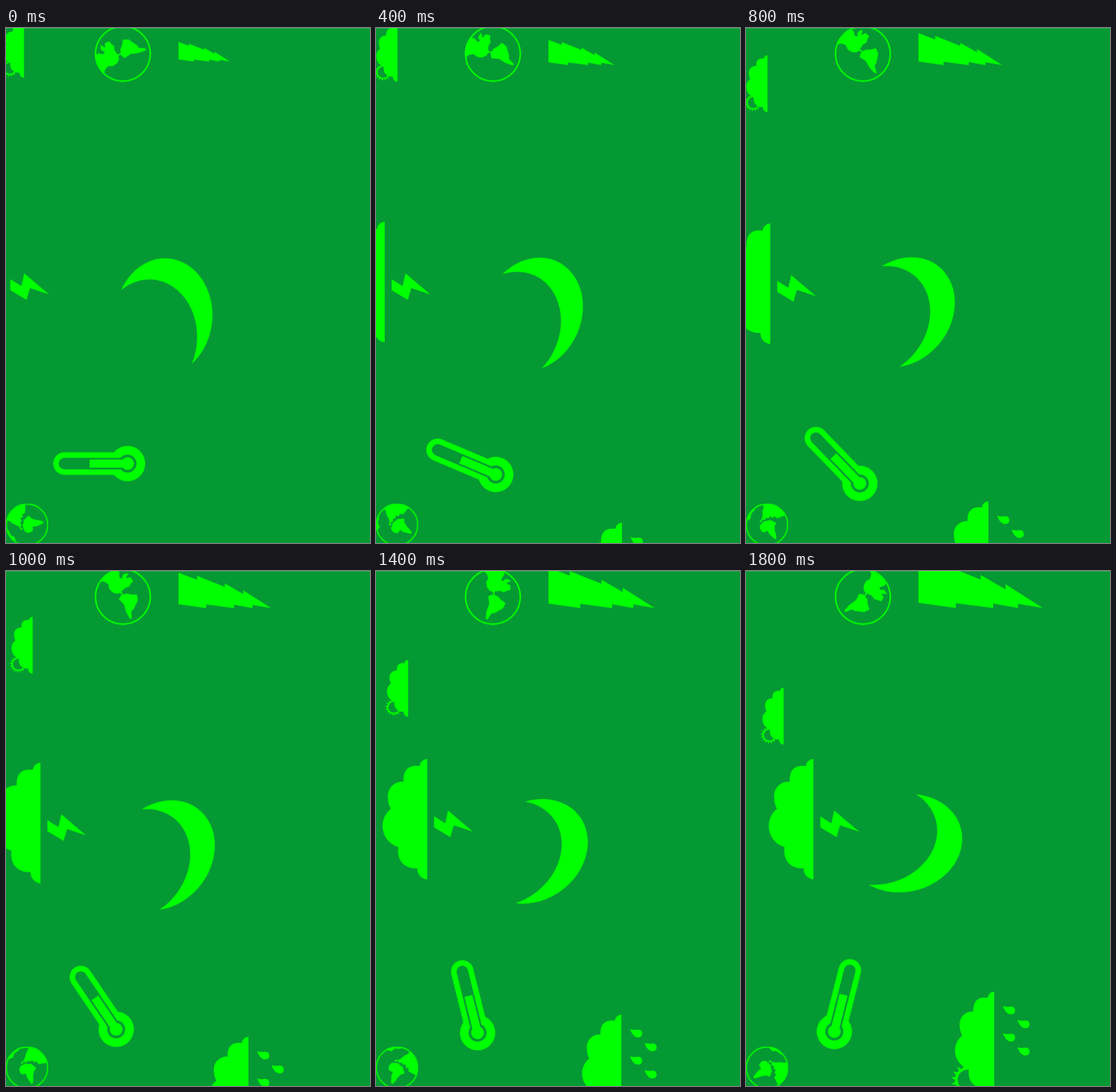
Write an HTML page that moves like this. It is 629x890 px and loops after 2000 ms.

```html
<!DOCTYPE html>
<html lang="en">
<head>
<meta charset="utf-8">
<title>Weather icons</title>
<style>
  html, body { margin: 0; width: 100%; height: 100%; overflow: hidden; background: #059933; }
  svg { display: block; width: 629px; height: 890px; }
  g { transform-origin: 0 0; }
</style>
</head>
<body>
<svg viewBox="0 0 629 890" fill="#0f0">
  <defs>
    <path id="cloud" d="M0 0A13 13 0 0 0-13 12H-15C-32 10-42 19-41 39C-57 38-68 50-68 65Q-68 77-63 86A38 38 0 0 0-50 152C-53 175-40 190-17 189A18 18 0 0 0 0 208Z"/>
    <g id="sunny">
      <circle cx="-52" cy="173" r="22.5" fill="none" stroke="#0f0" stroke-width="5"/>
      <path id="rays"/>
      <use href="#cloud"/>
    </g>
    <path id="drop" d="M0 0Q8 2 13 .8C18 0 21 3 21 7.5C21 12 18 14.2 14 14.2C7 14.2 3 8 0 0Z"/>
  </defs>

  <g id="wedge">
    <path d="M0-38.2L20-30.6V-34.8L50-22.9V-26.6L70-15.1V-19.1L100 0L80-3.4V0L60-3.6V0L30-3.9V0L0-4.2Z"/>
  </g>

  <g transform="translate(202 44.5)">
    <circle r="47.3" fill="none" stroke="#0f0" stroke-width="2.6"/>
    <g class="globe">
      <path d="M-27-38L-21-36L-16-29L-17.5-21L-14-13L-8-8.5L-2-8L0-3L3-2.5L1-6L1-10L5-11L8-13L16-12.5L20-16L26-19L24-27L16-28L23-35L14-36L9-30L6-33L9-42L7-46A46.6 46.6 0 0 0-27-38Z"/>
      <path d="M-8 1.5L-2-3.5L8-3L15 1.5L24 5L22 15L10 26.5L5 28.5L1 40.5L-2 40L-4 27L-3 13Z"/>
    </g>
  </g>

  <g transform="translate(36.3 858.5)">
    <circle r="35.8" fill="none" stroke="#0f0" stroke-width="2.2"/>
    <g class="globe">
      <path d="M35 4L21 1L19-5L15-4L13-9L8-8L6-11L2-9L-2-12L-6-8L-7-12L-1-14L3-18L7-24L12-28L14-32A35 35 0 0 1 35 4Z"/>
      <path d="M-25-25L-17-25L-12-31L-3-33L-2-35A35 35 0 0 0-25-25Z"/>
      <path d="M-14-1L-11-6L0-8L5-5L9-4L12 1L15 6L9 10L5 17L4 21L0 29L-3 28L-6 15L-5 9L-12 8L-14 4Z"/>
    </g>
  </g>

  <g id="sun"><use href="#sunny" transform="scale(.474)"/></g>

  <g id="storm">
    <use href="#cloud"/>
    <path d="M12 99L31 111L36 89L79 125.5L46 114.5L40 135L12 118Z"/>
  </g>

  <g id="rain">
    <use href="#sunny" transform="scale(.88)"/>
    <use href="#drop" x="15" y="25"/>
    <use href="#drop" x="40" y="49"/>
    <use href="#drop" x="15" y="72"/>
    <use href="#drop" x="40" y="96"/>
  </g>

  <g id="moon">
    <path d="M1.5-88A100.8 83.8-41.4 1 1-1.5 88A101.6 84.4-41.4 0 0 1.5-88Z"/>
  </g>

  <g id="thermo">
    <path d="M-60 0H49" stroke="#0f0" stroke-width="39" stroke-linecap="round"/>
    <circle cx="49" r="30.5"/>
    <path d="M-60 0H49" stroke="#059933" stroke-width="20" stroke-linecap="round"/>
    <circle cx="49" r="15.5" fill="#059933"/>
    <path d="M-16.5 0H49" stroke="#0f0" stroke-width="14"/>
    <circle cx="49" r="11"/>
  </g>

  <path d="M0 0H629V.6H0Z" fill="#fff" opacity=".4"/>
</svg>
<script>
const STEPS = 10, LOOP = 2000, RAYS = 16;

// Pointed rays around the sun
const ray = (a, r) => `${-52 + r * Math.cos(a)} ${173 + r * Math.sin(a)}`;
let rays = '';
for (let i = 0; i < RAYS; i++) {
  const a = .12 + i * 2 * Math.PI / RAYS;
  rays += `M${ray(a - .16, 23)}L${ray(a, 33)}L${ray(a + .16, 23)}Z`;
}
document.getElementById('rays').setAttribute('d', rays);

// Linear path through [step, ...values] points
const path = (...points) => step => {
  const i = Math.max(1, points.findIndex(p => p[0] >= step));
  const [t0, ...from] = points[i - 1], [t1, ...to] = points[i];
  const f = (step - t0) / (t1 - t0);
  return from.map((v, k) => v + (to[k] - v) * f);
};

// One pose per step, held until the next
function play(selector, route, toTransform) {
  const frames = Array.from({ length: STEPS }, (_, i) => ({
    transform: toTransform(...route(i)), offset: i / STEPS, easing: 'step-end'
  }));
  frames.push({ ...frames[STEPS - 1], offset: 1 });
  for (const el of document.querySelectorAll(selector))
    el.animate(frames, { duration: LOOP, iterations: Infinity });
}

const move = (x, y) => `translate(${x}px, ${y}px)`;
const turn = a => `rotate(${a}deg)`;

play('#wedge', path([0, 89, 58], [2, 114, 64], [5, 160, 64], [8, 195, 64], [9, 215, 64]),
  (w, y) => `${move(298, y)} scale(${w / 100})`);

play('.globe', path([0, -101.4], [2, -62.4], [5, -20.4], [9, 50.6]), turn);

play('#sun', path([0, 31, -12.5], [2, 37, -5.5], [4, 37, 47], [5, 46, 79],
  [6, 46, 133], [8, 65, 174], [9, 65, 201.5]), move);

play('#storm', path([0, -4.5, 335], [2, 15, 335], [4, 42, 338],
  [6, 77, 325], [8, 100, 325], [9, 116.5, 325]), move);

play('#rain', path([0, 427, 905], [2, 425, 855], [4, 419, 818], [5, 419, 805],
  [6, 424, 787.5], [8, 424, 746], [9, 429, 727]), move);

// The moon and thermometer drift along a curve as they turn
play('#moon', path([0, -44.9], [2, -23.9], [4, -11], [5, -11], [6, 0], [8, 8.7], [9, 26.6]),
  a => `${move(249.5 + .0053 * a * a, 490 - .83 * a - .0055 * a * a)} ${turn(a)}`);

play('#thermo', path([0, 0], [4, 45.9], [8, 86], [9, 104.2]),
  a => `${move(161 + .035 * a, 752.7 - .0004 * a * a)} ${turn(a)}`);
</script>
</body>
</html>
```
